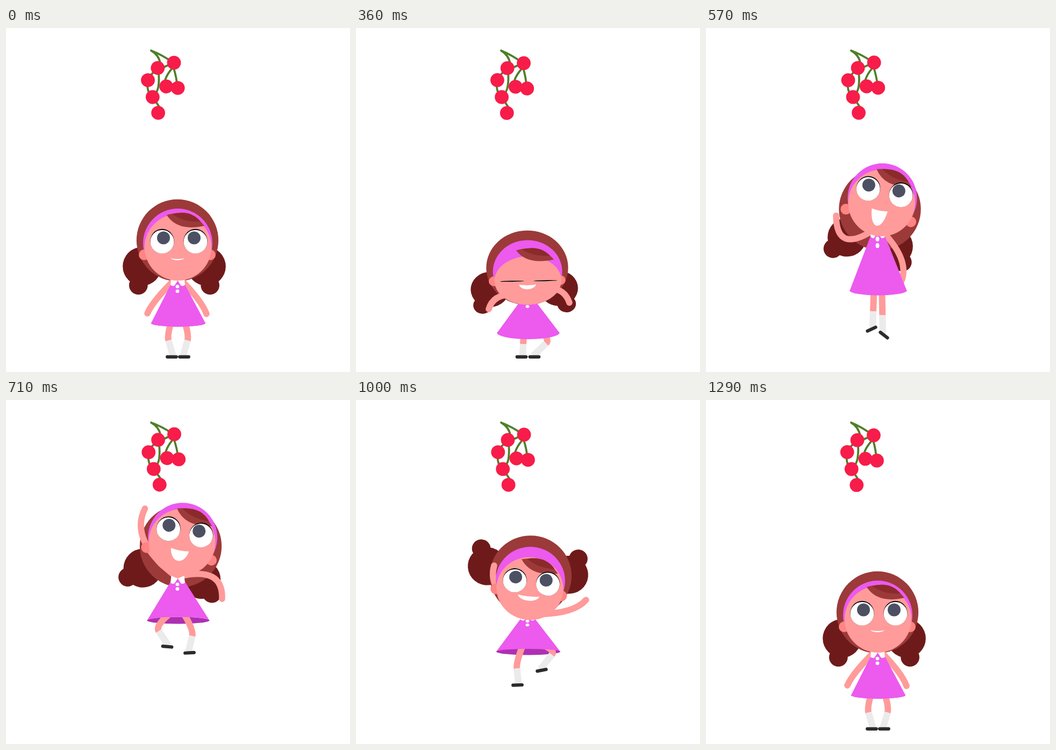
Recreate the animation shown at these times as an HTML page with a canvas. Size 640 by 640 pixels, loop 1370 ms.

```html
<!DOCTYPE html>
<html lang="en">
<head>
<meta charset="utf-8">
<title>Jumping for berries</title>
<style>
html, body { margin: 0; width: 100%; height: 100%; overflow: hidden; background: #fff; }
canvas { display: block; width: 640px; height: 640px; }
</style>
</head>
<body>
<canvas id="stage"></canvas>
<script>
const LOOP = 1370, LAST = 18, RAD = Math.PI / 180;
const canvas = document.getElementById('stage');
const ctx = canvas.getContext('2d');
const dpr = window.devicePixelRatio || 1;
canvas.width = canvas.height = 640 * dpr;

const C = {
  skin: '#ff9b9a', ear: '#ff8484', tail: '#6e1a1b', hair: '#9b3a39', fringe: '#8b2a2a',
  pink: '#ec5aee', under: '#ae30b2', pupil: '#4d5063', sock: '#ebebeb', shoe: '#2b2b2f',
  berry: '#f71c49', stem: '#4f7f2a', white: '#fff', black: '#000'
};

// Key poses: stand, crouch, take-off, top, hang, fall; then back to stand.
const BEATS = [0, 5, 8, 10, 12, 14, 16];
const tracks = {
  headX: [319, 318.5, 323.5, 325, 333, 325],
  headY: [395, 446, 337, 272, 262, 327],
  tilt: [0, -1, 11, 11, 14, 6],
  pitch: [2.5, 6, -33, -27, 6, 8],
  crouch: [0, 1, 0, 0, 0, .2],
  swing: [39, 34, 55, 44, -12, -7],
  flick: [79, 66, 50, 42, -50, -66],
  grin: [12.5, 16, 15, 17, 19, 20],
  gape: [5, 13, 40, 28, 17, 13],

  neck: [470, 502, 377, 332, 347, 402],
  hem: [549, 567, 488.5, 410, 414, 468],
  flare: [50.5, 58, 53, 58, 59.5, 59.5],
  sag: [6.8, 12, 9, -6.5, -6.5, -5],

  handLX: [263, 247, 242, 258.5, 265, 257],
  handLY: [531, 523, 349, 202, 208, 308],
  bendL: [-7, -30, 70, 52, 44, 38],
  handRX: [373, 397, 364, 402, 427, 428],
  handRY: [532, 511, 470, 370, 346, 372],
  bendR: [8, 40, 30, 55, 16, -22],

  footLX: [310.5, 310, 310, 302, 297, 302.5],
  footLY: [609.5, 609.5, 558, 456.5, 460, 528],
  toeL: [0, 0, -25, 5, 14, -2],
  footRX: [329.5, 330, 329, 339.5, 347, 343.5],
  footRY: [609.5, 609.5, 569, 468, 452.5, 500.5],
  toeR: [0, 0, 38, -3, -14, -11]
};

// Monotone cubic through the beats, flat at both ends.
function curve(ys, x) {
  const xs = BEATS, n = xs.length - 1;
  if (x >= xs[n]) return ys[n];
  let i = 0;
  while (x >= xs[i + 1]) i++;
  const sec = j => (ys[j + 1] - ys[j]) / (xs[j + 1] - xs[j]);
  const slope = j => {
    if (j === 0 || j === n) return 0;
    const a = sec(j - 1), b = sec(j);
    return a * b <= 0 ? 0 : 2 * a * b / (a + b);
  };
  const h = xs[i + 1] - xs[i], u = (x - xs[i]) / h, v = 1 - u;
  return ys[i] * v * v * (1 + 2 * u) + ys[i + 1] * u * u * (3 - 2 * u)
    + h * u * v * (slope(i) * v - slope(i + 1) * u);
}

function poseAt(x) {
  const pose = {};
  for (const name in tracks) pose[name] = curve([...tracks[name], tracks[name][0]], x);
  return pose;
}

function oval(x, y, rx, ry, color) {
  ctx.fillStyle = color;
  ctx.beginPath();
  ctx.ellipse(x, y, rx, ry, 0, 0, 7);
  ctx.fill();
}

function fill(d, color) {
  ctx.fillStyle = color;
  ctx.fill(new Path2D(d));
}

function line(d, width, color, cap = 'round') {
  ctx.lineWidth = width;
  ctx.strokeStyle = color;
  ctx.lineCap = cap;
  ctx.stroke(new Path2D(d));
}

function inFrame(x, y, deg, scaleY, paint) {
  ctx.save();
  ctx.translate(x, y);
  ctx.rotate(deg * RAD);
  ctx.scale(1, scaleY);
  paint();
  ctx.restore();
}

// Berries hang from (0, 0) and sway there.
const STEMS = 'M0 0Q14 8 17 24L13 34M0 0Q20 8 38 21M42 24Q28 28 18 34'
  + 'M12 34Q-2 44-7 55Q-9 75-2 82M13 36Q15 52 13 66Q12 75 3 88L15 106'
  + 'M41 31Q24 49 24 65M41 31Q47 50 48 68';
const BERRIES = [[42.3, 23], [12, 32.5], [-6.5, 55], [27.5, 67], [49, 70], [2, 86.5], [12, 116]];

function drawBerries(step) {
  const sway = -.55 - 1.4 * Math.cos((step - 10.8) * .436);
  inFrame(270, 42, sway, 1, () => {
    line(STEMS, 3.8, C.stem);
    for (const [x, y] of BERRIES) oval(x, y, 12.9, 12.9, C.berry);
  });
}

function drawHair({ swing, flick }) {
  for (const side of [-1, 1]) {
    const x = -6 + side * 77 * Math.cos(swing * RAD), y = 77 * Math.sin(swing * RAD);
    const reach = 26 + 10 * Math.abs(Math.sin(flick * RAD));
    oval(x, y, 36, 36, C.tail);
    oval(x + side * reach * Math.cos(flick * RAD), y + reach * Math.sin(flick * RAD), 17.4, 17.4, C.tail);
  }
  oval(0, 0, 76.2, 76.2, C.hair);
}

function drawArm(sx, sy, hx, hy, bend) {
  const dx = hx - sx, dy = hy - sy, len = Math.hypot(dx, dy);
  const ex = sx + dx * .7 + dy / len * bend, ey = sy + dy * .7 - dx / len * bend;
  line(`M${sx} ${sy}Q${ex} ${ey} ${hx} ${hy}`, 11.6, C.skin);
}

// Two equal bones of 41 px; the knee points outward.
function drawLeg(side, hy, ax, ay, toe, bend) {
  const hx = 320 + side * 7, dx = ax - hx, dy = ay - hy, len = Math.hypot(dx, dy);
  const out = side * bend * 1.3 * Math.sqrt(Math.max(0, 41 * 41 - len * len / 4));
  const kx = hx + dx / 2 + dy / len * out, ky = hy + dy / 2 - dx / len * out;
  const sx = kx + (ax - kx) * .3, sy = ky + (ay - ky) * .3;
  line(`M${hx} ${hy}Q${kx} ${ky} ${sx} ${sy}`, 12, C.skin, 'butt');
  line(`M${sx} ${sy}L${ax} ${ay}`, 12.4, C.sock, 'butt');
  inFrame(ax + 2 * side, ay + 2.3, toe, 1, () => line('M-8.3 0H8.3', 6.2, C.shoe));
}

function drawDress({ neck, hem, flare, sag }) {
  const h = hem - neck, k = h / 79;
  fill(`M310 ${neck}H329L${320.5 + flare} ${hem}`
    + `A${flare} ${Math.abs(sag)} 0 0 ${sag > 0 ? 1 : 0} ${320.5 - flare} ${hem}Z`, C.pink);
  for (const s of [-1, 1]) {
    const x = d => 319.5 + s * d;
    fill(`M${x(0)} ${neck}L${x(12)} ${neck - 5}L${x(13.5)} ${neck + 8 * k}`
      + `Q${x(7)} ${neck + 13 * k} ${x(4)} ${neck + 6 * k}Z`, C.white);
  }
  for (const f of [.14, .25]) oval(319, neck + h * f, 3.4, 3.3 * k, C.white);
}

function drawFringe(y) {
  fill(`M-20 ${y}Q24 ${y - 13} 50 ${y + 20}Q0 ${y + 31}-20 ${y}Z`, C.hair);
  fill(`M-10 ${y - 2}Q24 ${y - 11} 43 ${y + 12}Q12 ${y + 14}-10 ${y - 2}Z`, C.fringe);
}

function drawEye(x, y, open, dx) {
  oval(x, y - .8, 22.2, open + .9, C.black);
  ctx.save();
  ctx.beginPath();
  ctx.ellipse(x, y + .2, 22, open, 0, 0, 7);
  ctx.clip();
  oval(x, y, 23, 23, C.white);
  oval(x + dx, y - 7 * open / 22, 12, 12 * open / 22, C.pupil);
  ctx.restore();
}

function drawMouth(y, w, depth) {
  fill(`M${-w} ${y}Q0 ${y + 3} ${w} ${y}C${w - 4} ${y + depth} ${4 - w} ${y + depth} ${-w} ${y}Z`, C.white);
}

// Nodding slides the layers of the face over the round head by different amounts.
function drawFace({ tilt, pitch, crouch, grin, gape }) {
  const nod = pitch - 2.5;
  const slide = (up, down) => Math.max(up * nod, down * nod);
  const earY = 27 + slide(.42, 1) - 4 * crouch;
  const eyeY = pitch + 22 * crouch;
  const open = .2 + 21.8 * (1 - crouch ** 3);
  oval(.5, 5.5 + .75 * nod, 64.5, 64.5, C.pink);
  for (const s of [-1, 1]) oval(s * 61.5 - .5, earY, 10, 10, C.ear);
  oval(1, 13 + slide(.7, 1.8) + 7 * crouch, 62.2, 62 - 12.5 * crouch, C.skin);
  drawFringe(-47 + slide(.7, 3.2));
  for (const s of [-1, 1]) drawEye(2.5 + 31 * s, eyeY, open, -2.5 * s - .25 * tilt);
  drawMouth(31 + .9 * pitch - 2 * crouch, grin, gape);
}

function draw(step) {
  const p = poseAt(step);
  const headFrame = paint => inFrame(p.headX, p.headY, p.tilt, 1 - .09 * p.crouch, paint);
  ctx.setTransform(dpr, 0, 0, dpr, 0, 0);
  ctx.fillStyle = C.white;
  ctx.fillRect(0, 0, 640, 640);

  drawBerries(step);
  headFrame(() => drawHair(p));
  drawArm(316, p.neck - 4, p.handLX, p.handLY, p.bendL);
  drawArm(323, p.neck - 4, p.handRX, p.handRY, p.bendR);
  oval(320.5, p.hem, p.flare, 6.5, C.under);
  drawLeg(-1, p.hem - 19, p.footLX, p.footLY, p.toeL, 1 - p.crouch);
  drawLeg(1, p.hem - 19, p.footRX, p.footRY, p.toeR, 1);
  drawDress(p);
  headFrame(() => drawFace(p));
}

// The motion is stepped at 14 poses a second, on 10 ms ticks.
function stepAt(ms) {
  let k = 0;
  while (k < LAST && Math.round((k + 1) * 100 / 14) * 10 <= ms) k++;
  return k;
}

let shown = -1;
const start = performance.now();
function tick() {
  const step = stepAt((performance.now() - start) % LOOP);
  if (step !== shown) draw(shown = step);
  requestAnimationFrame(tick);
}
tick();
</script>
</body>
</html>
```
